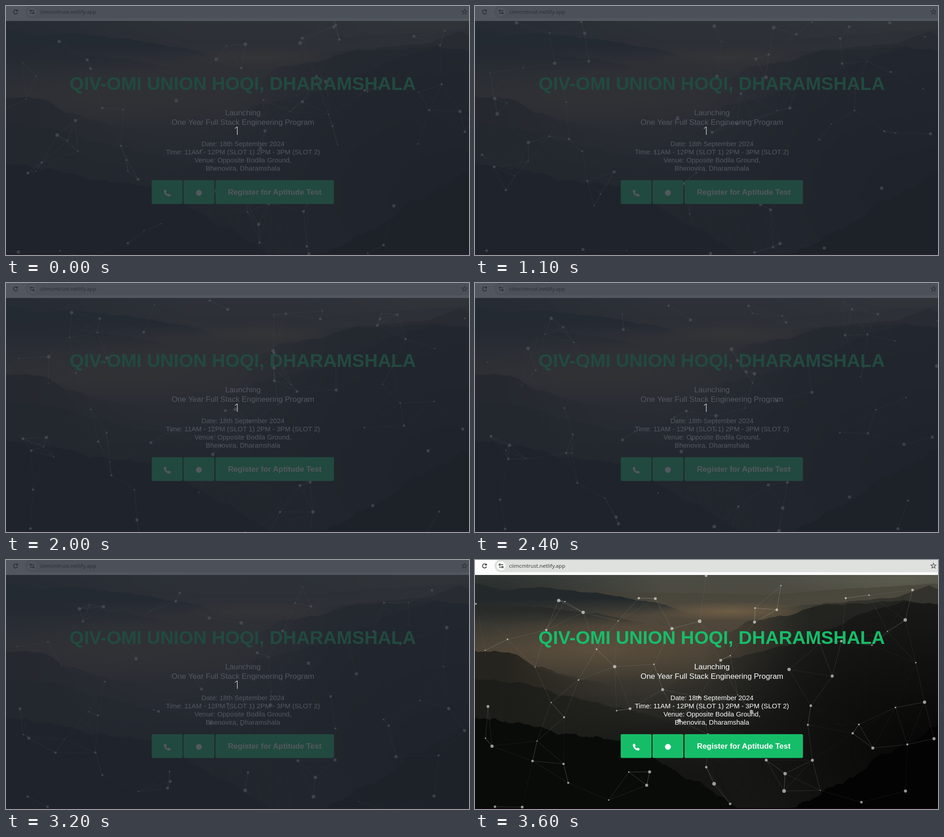
An HTML page with a canvas that plays this animation: 1020 by 549 pixels, repeating every 7200 ms.

```html
<!DOCTYPE html>
<html lang="en">
<head>
<meta charset="utf-8">
<title>Launch page</title>
<style>
  html, body { margin: 0; width: 100%; height: 100%; overflow: hidden; background: #000; }
  canvas, svg { position: absolute; left: 0; top: 0; display: block; }
  text { font-family: "Liberation Sans", Arial, sans-serif; fill: #fff; text-anchor: middle; }
  .title { font-size: 40.9px; font-weight: bold; fill: #16bd69; }
  .lead { font-size: 16.95px; }
  .info { font-size: 14.9px; }
  .action { font-size: 16.95px; font-weight: bold; }
  .url { font: 11.6px "Open Sans", "Noto Sans", sans-serif; fill: #303331; text-anchor: start; }
  .count { font: 300 26px "Open Sans", "Noto Sans", sans-serif; fill: #dde0e1; }
  .line { fill: none; stroke: #242725; stroke-width: 1.5; }
  .star { fill: none; stroke: #4a4d4b; stroke-width: 1.2; }
</style>
</head>
<body>
<canvas id="stage" width="1020" height="549"></canvas>
<svg width="1020" height="549" viewBox="0 0 1020 549">
  <rect width="1020" height="33" fill="#fcfdfc"/>
  <rect x="43" y="-1" width="1000" height="28" rx="14" fill="#dee1de"/>
  <circle cx="57.5" cy="13" r="10" fill="#fbfdfb"/>
  <path class="line" d="M24.8 10.2A4.6 4.6 0 1 0 25.5 14.5"/>
  <path d="M26 7.5V12H21.5Z" fill="#242725"/>
  <g class="line">
    <circle cx="54.5" cy="10.3" r="1.6"/><path d="M57.5 10.3H62"/>
    <circle cx="60.5" cy="15.7" r="1.6"/><path d="M53 15.7H57.5"/>
  </g>
  <path id="star" class="star"/>
  <text class="url" x="75" y="17">ciimcmtrust.netlify.app</text>

  <text class="title" x="521.5" y="184.5">QIV-OMI UNION HOQI, DHARAMSHALA</text>
  <g class="lead">
    <text x="522" y="241">Launching</text>
    <text x="522" y="261.6">One Year Full Stack Engineering Program</text>
  </g>
  <g class="info">
    <text x="522" y="309.3">Date: 18th September 2024</text>
    <text x="522" y="327.2">Time: 11AM - 12PM (SLOT 1) 2PM - 3PM (SLOT 2)</text>
    <text x="522" y="345">Venue: Opposite Bodila Ground,</text>
    <text x="522" y="362.8">Bhenovira, Dharamshala</text>
  </g>
  <g fill="#16bd69">
    <rect x="321" y="384" width="68" height="52.5" rx="3"/>
    <rect x="391" y="384" width="68" height="52.5" rx="3"/>
    <rect x="461.5" y="384" width="261" height="52.5" rx="3"/>
  </g>
  <path fill="#fff" d="M348.5 406l3-1.2 2.600 4.200-1.800 2.200q1.500 3 4.300 4.300l2.200-1.800 4 2.600-1 3q-2 1.500-5 .3-6.500-2.700-8.700-8.700-1.200-3 .4-4.900z"/>
  <circle cx="425" cy="412" r="6.5" fill="#fff"/>
  <text class="action" x="592" y="416.4">Register for Aptitude Test</text>

  <g id="shade">
    <rect width="1020" height="549" fill="#262a35" opacity=".79"/>
    <text class="count" x="509" y="283.5">1</text>
  </g>
</svg>
<script>
const W = 1020, H = 549, TOP = 33;
const LOOP = 7200, STEP = 100, MOVE_END = 3600, SHADE_END = 3300;
const COLS = 11, ROWS = 7, SPEED = 65, MARGIN = 12, LINK = 120;

const ctx = document.getElementById('stage').getContext('2d');
const shade = document.getElementById('shade');

function seeded(seed) {
  return () => {
    seed = (seed * 1664525 + 1013904223) % 4294967296;
    return seed / 4294967296;
  };
}

function starPath(cx, cy, outer, inner) {
  const corners = Array.from({ length: 10 }, (_, i) => {
    const r = i % 2 ? inner : outer, turn = i * Math.PI / 5;
    return `${cx + r * Math.sin(turn)} ${cy - r * Math.cos(turn)}`;
  });
  return `M${corners.join('L')}Z`;
}

function fade(fill, rgb, from, to) {
  fill.addColorStop(0, `rgba(${rgb},${from})`);
  fill.addColorStop(1, `rgba(${rgb},${to})`);
  return fill;
}

function glow(g, x, y, rx, ry, rgb, alpha) {
  g.save();
  g.translate(x, y);
  g.scale(rx, ry);
  g.fillStyle = fade(g.createRadialGradient(0, 0, 0, 0, 0, 1), rgb, alpha, 0);
  g.fillRect(-1, -1, 2, 2);
  g.restore();
}

// A hill crest through a few key points, roughened by trees, filled down to base
function ridge(g, crest, rough, fill, base = H) {
  const rnd = seeded(crest.length * 31 + base);
  const end = crest[crest.length - 1];
  g.fillStyle = fill;
  g.beginPath();
  g.moveTo(crest[0][0], base);
  for (let i = 0; i < crest.length - 1; i++) {
    const [x0, y0] = crest[i], [x1, y1] = crest[i + 1];
    for (let x = x0; x < x1; x += 2.5) {
      const k = (x - x0) / (x1 - x0);
      const ease = (k + k * k * (3 - 2 * k)) / 2;
      const bumps = Math.sin(x / 9) + Math.sin(x / 4) / 2 + rnd() - 0.5;
      g.lineTo(x, y0 + (y1 - y0) * ease + bumps * rough);
    }
  }
  g.lineTo(...end);
  g.lineTo(end[0], base);
  g.fill();
}

function paintHills() {
  const pic = document.createElement('canvas');
  pic.width = W;
  pic.height = H;
  const g = pic.getContext('2d');
  const across = (x0, x1, rgb, from, to) => fade(g.createLinearGradient(x0, 0, x1, 0), rgb, from, to);
  const down = (y0, y1, rgb, from, to) => fade(g.createLinearGradient(0, y0, 0, y1), rgb, from, to);

  // sky and valley
  const sky = g.createLinearGradient(0, TOP, 0, H);
  ['#4a4c45', '#50483b', '#494236', '#35332d', '#1d1e1b', '#111210', '#0a0b0a']
    .forEach((color, i, all) => sky.addColorStop(i / (all.length - 1), color));
  g.fillStyle = sky;
  g.fillRect(0, 0, W, H);
  glow(g, 0, 75, 420, 130, '24,33,36', 0.75);
  glow(g, 940, 40, 300, 50, '106,106,88', 0.55);

  // far hills
  ridge(g, [[150, 66], [400, 72], [640, 76], [850, 62], [1020, 52]], 0.4,
    down(60, 112, '66,64,54', 0.6, 0), 112);
  ridge(g, [[640, 108], [780, 95], [925, 83], [1000, 57], [1020, 64]], 0.7,
    across(640, 820, '48,48,42', 0, 0.9));
  ridge(g, [[0, 51], [60, 66], [140, 60], [260, 72], [400, 94], [480, 119]], 0.7,
    down(85, 122, '35,41,43', 1, 0), 122);
  ridge(g, [[0, 98], [120, 102], [260, 117], [372, 138]], 0.6,
    down(108, 145, '40,42,40', 0.95, 0), 145);
  glow(g, 560, 113, 170, 22, '126,104,74', 0.65);
  glow(g, 270, 198, 320, 72, '108,90,66', 0.5);

  // right slopes, rising out of the mist
  ridge(g, [[470, 215], [560, 160], [605, 134], [690, 122], [760, 99], [850, 96], [940, 89], [1020, 100]],
    1, across(500, 740, '35,36,32', 0, 1));
  ridge(g, [[330, 340], [480, 252], [560, 217], [700, 186], [780, 152], [870, 112], [950, 92], [1020, 98]],
    1.2, fade(g.createLinearGradient(400, 200, 800, 300), '24,25,23', 0, 0.95));

  // left slopes
  ridge(g, [[0, 201], [75, 203], [140, 236], [230, 262], [340, 285]], 1.2,
    across(70, 330, '38,36,30', 1, 0));
  ridge(g, [[0, 262], [110, 272], [200, 300], [320, 326], [480, 372], [640, 470], [720, H]], 1.5,
    across(0, 560, '27,28,24', 0.95, 0.2));

  // near woods
  glow(g, W, 420, 520, 330, '0,0,0', 0.8);
  ridge(g, [[0, 347], [120, 363], [190, 383], [300, 394], [370, 425], [480, 486], [590, H]], 2.2,
    down(345, 470, '9,11,9', 1, 1));
  ridge(g, [[690, H], [830, 482], [890, 432], [960, 402], [W, 365]], 3, '#020302');
  g.fillStyle = '#12060e';
  g.fillRect(0, H - 2.5, W, 2.5);
  return pic;
}

// One dot per grid cell, drifting straight
function makeDots() {
  const rnd = seeded(2024);
  const drift = () => (rnd() * 2 - 1) * SPEED;
  return Array.from({ length: COLS * ROWS }, (_, i) => ({
    x: (i % COLS + rnd()) * W / COLS,
    y: TOP + (Math.floor(i / COLS) + rnd()) * (H - TOP) / ROWS,
    vx: drift(),
    vy: drift(),
    r: 1 + rnd() * 3.3
  }));
}

function wrap(v, low, high) {
  const span = high - low;
  return low + ((v - low) % span + span) % span;
}

const hills = paintHills();
const dots = makeDots();
document.getElementById('star').setAttribute('d', starPath(1010, 13, 6, 2.5));

function drawNet(time) {
  const s = (time - MOVE_END) / 1000;
  const net = dots.map(d => ({
    x: wrap(d.x + d.vx * s, -MARGIN, W + MARGIN),
    y: wrap(d.y + d.vy * s, TOP - MARGIN, H + MARGIN),
    r: d.r
  }));
  ctx.save();
  ctx.beginPath();
  ctx.rect(0, TOP, W, H - TOP);
  ctx.clip();
  ctx.lineWidth = 0.9;
  net.forEach((a, i) => net.slice(i + 1).forEach(b => {
    const gap = Math.hypot(a.x - b.x, a.y - b.y);
    if (gap >= LINK) return;
    ctx.strokeStyle = `rgba(255,255,255,${0.42 * (1 - gap / LINK)})`;
    ctx.beginPath();
    ctx.moveTo(a.x, a.y);
    ctx.lineTo(b.x, b.y);
    ctx.stroke();
  }));
  ctx.fillStyle = 'rgba(255,255,255,.56)';
  net.forEach(({ x, y, r }) => {
    ctx.beginPath();
    ctx.arc(x, y, r, 0, Math.PI * 2);
    ctx.fill();
  });
  ctx.restore();
}

function frame() {
  const now = performance.now() % LOOP;
  const time = Math.min(Math.floor(now / STEP) * STEP, MOVE_END);
  ctx.drawImage(hills, 0, 0);
  drawNet(time);
  shade.style.display = time < SHADE_END ? '' : 'none';
  requestAnimationFrame(frame);
}
frame();
</script>
</body>
</html>
```
